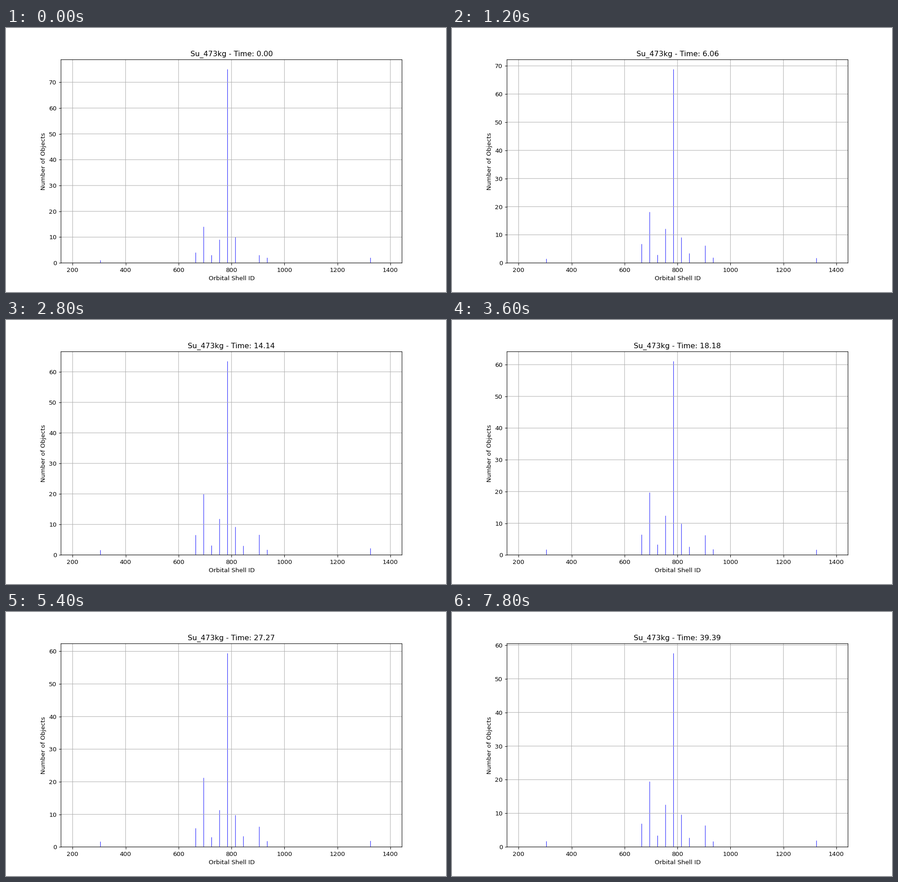
A matplotlib script that plays this animation: 966x580 px, repeating every 8 s.

```python
import numpy as np
import matplotlib.pyplot as plt
from matplotlib.animation import FuncAnimation
from matplotlib.patheffects import Normal

W, H, DPI = 966, 580, 96.6
FRAMES, INTERVAL = 40, 200
X_MIN, X_MAX = 156.06, 1443.94

# Shell: (count at the start, level it settles to)
SHELLS = {
    305: (1, 1.6), 665: (4, 6.4), 695: (14, 20.3), 725: (3, 3.1),
    755: (9, 11.7), 785: (75, 57), 815: (10, 9.4), 845: (0, 3),
    905: (3, 6.3), 935: (2, 1.7), 1325: (2, 1.85),
}
start, level = np.array(list(SHELLS.values())).T
noise = np.random.default_rng(4).normal(0, 0.12, (FRAMES, len(SHELLS)))


def counts(step):
    """Relax towards the level, fuller shells more slowly, with a jitter."""
    settled = 1 - np.exp(-4 * step / level)
    jitter = noise[step] * np.sqrt(level)
    return start + (level - start + jitter) * settled


# The small margin keeps the canvas from being rounded down a pixel.
fig, ax = plt.subplots(figsize=((W + 0.01) / DPI, (H + 0.01) / DPI), dpi=DPI)
fig.subplots_adjust(left=0.125, right=0.9, bottom=0.11, top=0.88)

# Lines are antialiased at fractional pixels, half a pixel right and down.
soft = dict(snap=False, path_effects=[Normal(offset=(0.36, -0.36))])
ax.grid(True, **soft)
for spine in ax.spines.values():
    spine.set(**soft)

bar_width = (X_MAX - X_MIN) / 775
bars = ax.bar(list(SHELLS), start, width=bar_width, color="blue", snap=False)
ax.set_xlim(X_MIN, X_MAX)
ax.set_xlabel("Orbital Shell ID")
ax.set_ylabel("Number of Objects")
title = ax.set_title("")


def update(step):
    heights = counts(step)
    for bar, height in zip(bars, heights):
        bar.set_height(height)
    ax.set_ylim(0, 1.05 * heights.max())
    title.set_text(f"Su_473kg - Time: {step * 100 / 99:.2f}")
    return [*bars, title]


anim = FuncAnimation(fig, update, frames=FRAMES, init_func=lambda: update(0),
                     interval=INTERVAL, repeat=True, repeat_delay=0)
plt.show()
```
